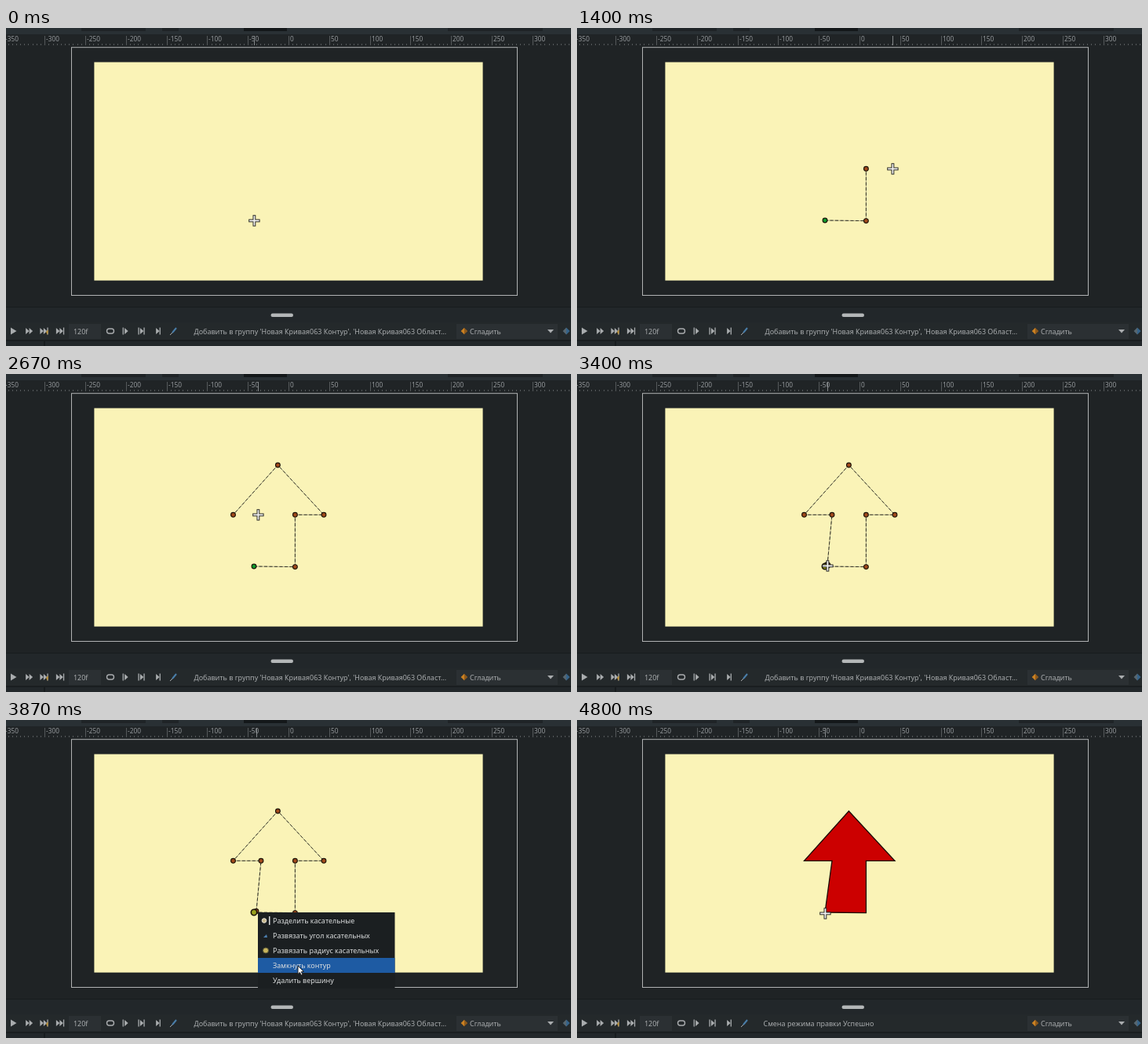
Recreate the animation shown at these times as an HTML page with a canvas. Size 720 by 405 pixels, loop 4.99 s.

```html
<!DOCTYPE html>
<html lang="ru">
<head>
<meta charset="utf-8">
<style>
html, body { margin: 0; width: 100%; height: 100%; overflow: hidden; background: #1f2325; }
canvas { display: block; }
</style>
</head>
<body>
<canvas id="stage" width="720" height="405"></canvas>
<script>
const c = document.getElementById('stage').getContext('2d');
const LOOP = 4990, STEP = 1000 / 15;
const FONT = '"Noto Sans", "Open Sans", sans-serif', SIZE = 8.95;
const INK = '#a9acae';

// The arrow is clicked corner by corner at an even pace, then closed from a menu
const corners = [[316, 245], [368.4, 245.6], [368.4, 179.3], [405, 179.3], [346.4, 116], [289.5, 179.3], [325, 179.3], [319, 243.5]];
const click = i => 225 + 425 * i;
const REST = 130, GLIDE = 235;
const MENU_ON = 3460, MENU_OFF = 3920, FILLED = 4660;
const menuItem = [372, 313];
const rows = ['Разделить касательные', 'Развязать угол касательных', 'Развязать радиус касательных', 'Замкнуть контур', 'Удалить вершину'];
const ROW = 19.1;

function glide(a, b, u) {
  u = Math.min(1, Math.max(0, u));
  const e = u * u * (3 - 2 * u);
  return a.map((v, k) => v + (b[k] - v) * e);
}

function pointer(t) {
  if (t >= MENU_OFF) return glide(menuItem, [316, 246], (t - MENU_OFF) / GLIDE);
  if (t >= MENU_ON - 60) return glide(corners[7], menuItem, (t - MENU_ON + 60) / 400);
  const i = Math.max(0, Math.floor((t - click(0)) / 425));
  return glide(corners[i], corners[Math.min(i + 1, 7)], (t - click(i) - REST) / GLIDE);
}

function box(x, y, w, h, color) {
  c.fillStyle = color;
  c.fillRect(x, y, w, h);
}

function pill(x, y, w, h) {
  c.beginPath();
  c.roundRect(x, y, w, h, h / 2);
}

function poly(points, closed) {
  c.beginPath();
  points.forEach(([x, y]) => c.lineTo(x, y));
  if (closed) c.closePath();
}

function fill(color) {
  c.fillStyle = color;
  c.fill();
}

function stroke(color, width) {
  c.strokeStyle = color;
  c.lineWidth = width;
  c.stroke();
}

function shape(color, ...points) {
  poly(points, true);
  fill(color);
}

function line(color, width, ...points) {
  poly(points);
  stroke(color, width);
}

function dot(x, y, r, color, width = 1.1, edge = '#1a1208') {
  c.beginPath();
  c.arc(x, y, r, 0, 7);
  fill(color);
  stroke(edge, width);
}

function text(s, x, y, size = SIZE, color = INK) {
  c.font = `${size}px ${FONT}`;
  c.fillStyle = color;
  c.fillText(s, x, y);
}

function ruler(x) {
  box(0, 8, 720, 15, '#202426');
  for (let v = -350; v <= 350; v += 5) {
    const tx = Math.round(360 + v * 1.036);
    if (v % 50) {
      box(tx, 20, 1, 2, '#55595b');
    } else {
      box(tx, 10, 1, 12, '#55595b');
      if (v < 350) text(v, tx + 2, 17, 8.3, '#93979a');
    }
  }
  box(Math.round(x), 10, 1, 12, '#85898b');
}

// Player symbols: ">" is a triangle, "|" a bar
function symbol(s, x) {
  x -= s.length * 2.2;
  for (const ch of s) {
    if (ch === '|') box(x, 381.5, 1.3, 9, INK);
    else shape(INK, [x, 382], [x + 4.5, 386], [x, 390]);
    x += ch === '|' ? 2.5 : 4.5;
  }
}

function diamond(x, r, left, right) {
  shape(left, [x - r, 386], [x, 386 - r], [x, 386 + r]);
  shape(right, [x + r, 386], [x, 386 - r], [x, 386 + r]);
}

function toolbar(t) {
  box(0, 355, 720, 1, '#181c1e');
  box(0, 356, 720, 19, '#22272a');
  box(0, 375, 720, 22, '#24292b');
  box(0, 397, 720, 2, '#1a1e20');
  box(0, 399, 720, 6, '#22272a');
  box(48, 399, 2, 6, '#181c1e');
  pill(337.5, 363.5, 28.5, 4.5);
  fill('#b4b7b8');

  shape(INK, [6, 381.5], [13.5, 386], [6, 390.5]);
  symbol('>>', 29.5);
  symbol('>>|', 50);
  symbol('>>|', 70.5);
  symbol('|>', 153);
  symbol('|>|', 175);
  symbol('>|', 195.5);
  shape('#b98d30', [51, 387], [54, 384], [53, 391]);
  pill(128.5, 383, 9, 6);
  stroke(INK, 1.4);
  line('#4a7ea9', 2, [212, 388], [217, 382]);
  line(INK, 1, [209, 391], [212, 388]);

  box(80, 377, 41, 19, '#2b3033');
  text('120f', 86, 389.5);
  box(574, 377, 129, 19, '#2b3033');
  diamond(584, 4.3, '#cc8122', '#8f5a1d');
  text('Сгладить', 591, 389.5);
  shape(INK, [690, 384], [698, 384], [694, 388.5]);
  diamond(714, 4.5, '#566670', '#35638a');

  if (t < FILLED) text("Добавить в группу 'Новая Кривая063 Контур', 'Новая Кривая063 Област...", 239.5, 389.5);
  else text('Смена режима правки Успешно', 237.5, 389.5);
}

function workspace(t, x) {
  box(0, 0, 720, 405, '#1f2325');
  box(0, 0, 720, 8, '#293034');
  box(96, 0, 82, 4, '#1f2427');
  box(199, 0, 21, 4, '#1f2427');
  box(303, 0, 55, 4, '#14181a');
  box(563, 0, 121, 4, '#1f2427');
  ruler(x);
  box(112.4, 43.5, 495.2, 278.1, '#faf3b7');
  // The border blinks off while the contour is redrawn
  if (t < 4190 || t >= 4320) {
    c.strokeStyle = '#b0b2b3';
    c.lineWidth = 1;
    c.strokeRect(83.5, 24.7, 568, 315.8);
  }
}

function contour(t, [x, y]) {
  const closed = t >= MENU_OFF;
  const open = t >= MENU_ON && !closed;
  const shown = corners.filter((_, i) => closed ? i < 7 : click(i) <= t);
  poly(shown, closed);
  if (t >= FILLED) {
    fill('#cc0000');
    stroke('#1a0804', 1.3);
    return;
  }
  stroke('#a3a07f', 0.9);
  c.setLineDash([4, 2.5]);
  stroke('#26261c', 0.9);
  c.setLineDash([]);

  for (let i = shown.length - 1; i >= 0; i--) {
    if (t < click(i) + 60) continue;
    const [px, py] = shown[i];
    const hover = open ? i === 0 : Math.hypot(px - x, py - y) < 5;
    const first = i === 0 && !closed;
    const color = !first ? '#a0491b' : hover ? '#99a01c' : '#0f9a2c';
    dot(px, py, hover ? 3.7 : 2.9, color, hover ? 1.6 : 1.1);
  }
}

function menu(y) {
  box(321, 245, 174.5, 97, '#1b1f21');
  const active = Math.floor((y - 246) / ROW);
  rows.forEach((s, i) => {
    const top = Math.round(246 + i * ROW);
    if (i === active) box(321, top, 174.5, 19, '#1e5ba3');
    text(s, 340, top + 13, SIZE, '#dcdedf');
  });
  dot(329, 255.5, 2.8, '#c9b98c', 1, '#e8e4da');
  box(335, 250, 1.5, 11, '#d6d8d9');
  shape('#4c7fae', [328, 277], [333, 277], [332, 273]);
  dot(331, 293.5, 3.5, '#c8b45c', 1, '#5b5a38');
}

function cross(x, y) {
  x = Math.round(x) + 0.4;
  y = Math.round(y) + 0.4;
  for (const [color, r, w] of [['#2b2b26', 7.2, 3.8], ['#f2f2f2', 6.2, 1.8]]) {
    line(color, w, [x - r, y], [x + r, y]);
    line(color, w, [x, y - r], [x, y + r]);
  }
}

function arrow(x, y) {
  const tip = [[0, 0], [0, 10.5], [2.4, 8.4], [4.2, 12], [6, 11.2], [4.3, 7.7], [7.5, 7.5]];
  poly(tip.map(([dx, dy]) => [x + dx, y + dy]), true);
  fill('#fff');
  stroke('#222', 1);
}

function draw() {
  const t = Math.floor((performance.now() % LOOP + 5) / STEP) * STEP;
  const at = pointer(t), open = t >= MENU_ON && t < MENU_OFF;
  workspace(t, open ? 319 : at[0]);
  toolbar(t);
  contour(t, at);
  if (open) {
    menu(at[1]);
    arrow(...at);
  } else cross(...at);
  requestAnimationFrame(draw);
}
draw();
</script>
</body>
</html>
```
